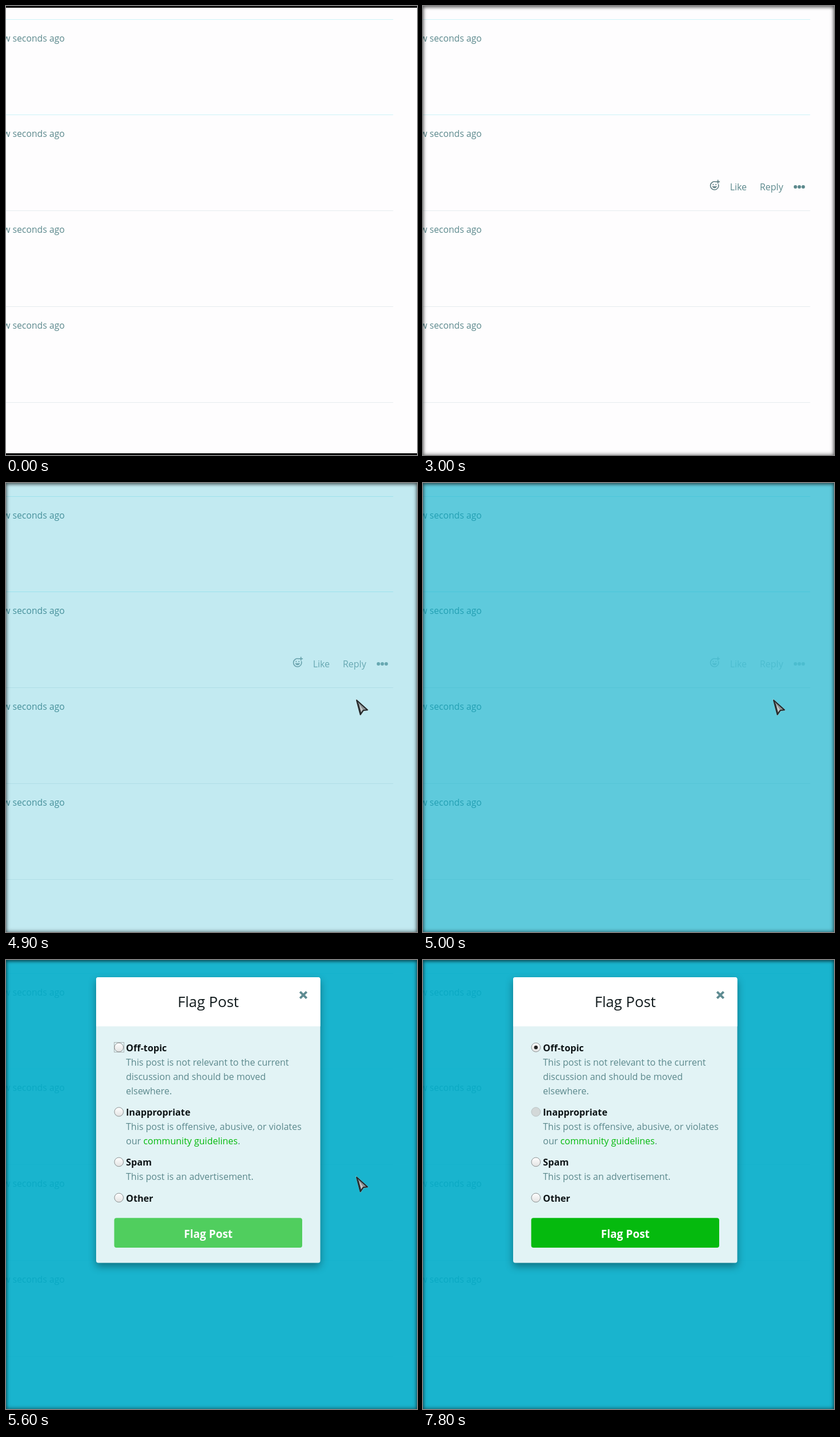
Write an HTML page that moves like this. It is 716 px wide and 782 px high and loops after 8000 ms.

```html
<!DOCTYPE html>
<html lang="en">
<head>
<meta charset="utf-8">
<title>Flag Post</title>
<style>
  html, body { margin: 0; width: 100%; height: 100%; overflow: hidden; background: #fefdfe; }
  svg { position: absolute; left: 0; top: 0; }
  text { font: 16px "Open Sans", "Noto Sans", sans-serif; fill: #5c898d; }
  .stamp { font-size: 15.7px; text-anchor: end; }
  .label { font-size: 16.2px; font-weight: 700; fill: #0d1416; }
  .title { font-size: 25.6px; text-anchor: middle; fill: #111a1c; }
  .action { font-size: 19px; font-weight: 700; text-anchor: middle; fill: #fff; }
  .link { fill: #05ba0e; }
  #modal { filter: drop-shadow(0 6px 7px rgba(0, 0, 0, .36)); }
  #menu rect:first-child { filter: drop-shadow(0 2px 3px rgba(0, 0, 0, .3)); }
  #edge { position: absolute; inset: 0; }
  .soft { box-shadow: inset 0 0 7px rgba(0, 0, 0, .6), inset 0 3px 5px rgba(0, 0, 0, .32); }
  .bars { border: solid #000; border-width: 3px 0; }
</style>
</head>
<body>
<svg width="716" height="782" viewBox="0 0 716 782">
  <defs>
    <linearGradient id="knob" x2="0" y2="1">
      <stop stop-color="#fff"/><stop offset="1" stop-color="#e2e2e2"/>
    </linearGradient>
    <g id="tools">
      <g fill="none" stroke="#5f7f84" stroke-width="1.6" stroke-linecap="round" transform="translate(0 -.6)">
        <path d="M510 140.3A7.1 7.1 0 1 0 514.6 145M513.8 137.5v5.4M511.1 140.2h5.4"/>
        <path d="M504.2 148.6a3.9 3.6 0 0 0 7.4 0z" fill="#5f7f84" stroke-width=".8"/>
        <path d="M505.5 144.8v.3M510.3 144.8v.3" stroke-width="2"/>
      </g>
      <text x="534.7" y="154">Like</text>
      <text x="586.7" y="154">Reply</text>
      <path d="M648.8 148.5h.01M655.6 148.5h.01M662.4 148.5h.01" stroke="#5c898d" stroke-width="6" stroke-linecap="round"/>
    </g>
  </defs>
  <g id="posts"></g>
  <use id="tools0" href="#tools"/>
  <use id="tools1" href="#tools" y="166.5"/>
  <g id="menu">
    <rect x="504" y="337" width="170" height="224" rx="4" fill="#fff"/>
    <rect id="pick" x="504" y="347" width="170" height="44" fill="#e8f5f6"/>
    <text x="524" y="375">Flag</text>
  </g>
  <rect id="cover" width="716" height="782" fill="rgb(0,172,201)"/>
  <g id="modal">
    <rect x="157" y="30" width="390.5" height="497.5" rx="4" fill="#e2f3f5"/>
    <path d="M157 115.5V34a4 4 0 0 1 4-4h382.5a4 4 0 0 1 4 4v81.5z" fill="#fff"/>
    <text class="title" x="352.3" y="82">Flag Post</text>
    <path d="M512.3 55.3l11.4 11.4m0-11.4l-11.4 11.4" stroke="#5f8c92" stroke-width="4"/>
    <g id="form"></g>
    <rect id="focus" x="188.5" y="143.5" width="17" height="17" fill="none" stroke="#777" stroke-dasharray="1 1"/>
    <circle id="dot" cx="196.7" cy="152.2" r="3.2" fill="#222"/>
    <rect id="button" x="188.5" y="449.3" width="327.5" height="51.7" rx="4"/>
    <text class="action" x="352.5" y="484">Flag Post</text>
  </g>
  <g id="cursor" stroke-linejoin="round">
    <path d="M0 0L20.5 18.5 13 19.5 7.5 27.5z" fill="#fff" stroke="#ddd" stroke-width="2" opacity=".4"/>
    <path d="M.8 1.2L19.8 18.2 12.6 19 7.4 26.5z" fill="#8f9596" stroke="#23282a" stroke-width="2"/>
    <path d="M1 2L11 18.5 7.4 26.5z" fill="#2b3032"/>
    <path d="M4.5 7L11.6 17.6 8.6 22.5z" fill="#c4c8c9"/>
  </g>
</svg>
<div id="edge"></div>
<script>
const $ = id => document.getElementById(id);
const ramp = (t, a, b) => Math.min(1, Math.max(0, (t - a) / (b - a)));
const fade = (id, v) => $(id).setAttribute('opacity', v);

$('posts').innerHTML = [0, 1, 2, 3, 4].map(i => {
  const y = Math.floor(23 + i * 166.8);
  const rule = `<path d="M0 ${y + .5}H674.5" stroke="${i < 2 ? '#cdf3f7' : '#e6ecef'}"/>`;
  return rule + (i < 4 ? `<text class="stamp" x="102.3" y="${y + 39}">a few seconds ago</text>` : '');
}).join('');

const options = [
  [152.2, 'Off-topic', 'This post is not relevant to the current', 'discussion and should be moved', 'elsewhere.'],
  [264.5, 'Inappropriate', 'This post is offensive, abusive, or violates',
    'our <tspan class="link">community guidelines</tspan>.'],
  [351.8, 'Spam', 'This post is an advertisement.'],
  [414, 'Other']
];
$('form').innerHTML = options.map(([y, name, ...lines], i) =>
  `<circle id="radio${i}" cx="196.7" cy="${y}" r="7.8" fill="url(#knob)" stroke="#8b9192"/>
   <text class="label" x="209" y="${y + 6.6}">${name}</text>` +
  lines.map((s, k) => `<text x="209" y="${y + 31.6 + k * 25}">${s}</text>`).join('')
).join('');

// Pointer legs of [time, x, y]; the arrow is hidden between legs.
const legs = [
  [[600, 8, 58], [800, 130, 150], [1100, 270, 186], [1300, 405, 165], [1400, 486, 146], [1500, 486, 146]],
  [[2700, 660, 185], [2900, 658, 280]],
  [[4900, 610, 377], [6000, 610, 377], [6300, 270, 285], [6400, 270, 285]]
];

function placeCursor(t) {
  const leg = legs.find(p => t >= p[0][0] && t < p[p.length - 1][0]);
  fade('cursor', leg ? 1 : 0);
  if (!leg) return;
  const i = leg.findIndex(p => p[0] > t);
  const [a, b] = [leg[i - 1], leg[i]];
  const k = ramp(t, a[0], b[0]);
  $('cursor').setAttribute('transform', `translate(${a[1] + (b[1] - a[1]) * k} ${a[2] + (b[2] - a[2]) * k})`);
}

function draw(t) {
  $('edge').className = t < 100 ? 'bars' : 'soft';
  fade('tools0', ramp(t, 500, 800) * (1 - ramp(t, 2600, 2900)));
  fade('tools1', ramp(t, 2600, 2900) * (1 - ramp(t, 4840, 5070)));
  fade('menu', t < 4900 ? ramp(t, 3500, 3800) : 0);
  fade('pick', ramp(t, 4000, 4400));
  fade('cover', .9 * ramp(t, 4840, 5070));

  const k = [0, .53, .88, 1][Math.min(3, Math.max(0, (t - 5000) / 100))];
  const s = .909 + .091 * k;
  fade('modal', k);
  $('modal').setAttribute('transform', `translate(352.3 278.8) scale(${s}) translate(-352.3 -278.8)`);
  fade('focus', t >= 5200 && t < 7400 ? 1 : 0);
  fade('dot', t >= 7400 ? 1 : 0);
  $('radio0').setAttribute('fill', t >= 6900 && t < 7400 ? '#d3d8d8' : 'url(#knob)');
  $('radio1').setAttribute('fill', t >= 7800 ? '#d3d8d8' : 'url(#knob)');
  $('radio1').setAttribute('stroke', t >= 7800 ? '#b9c2c3' : '#8b9192');
  const on = ramp(t, 7300, 7600);
  $('button').setAttribute('fill', `rgb(${80 - 75 * on},${206 - 20 * on},${94 - 80 * on})`);
  placeCursor(t);
}

function tick() {
  draw(Math.floor(performance.now() % 8000 / 100) * 100);
  requestAnimationFrame(tick);
}
tick();
</script>
</body>
</html>
```
